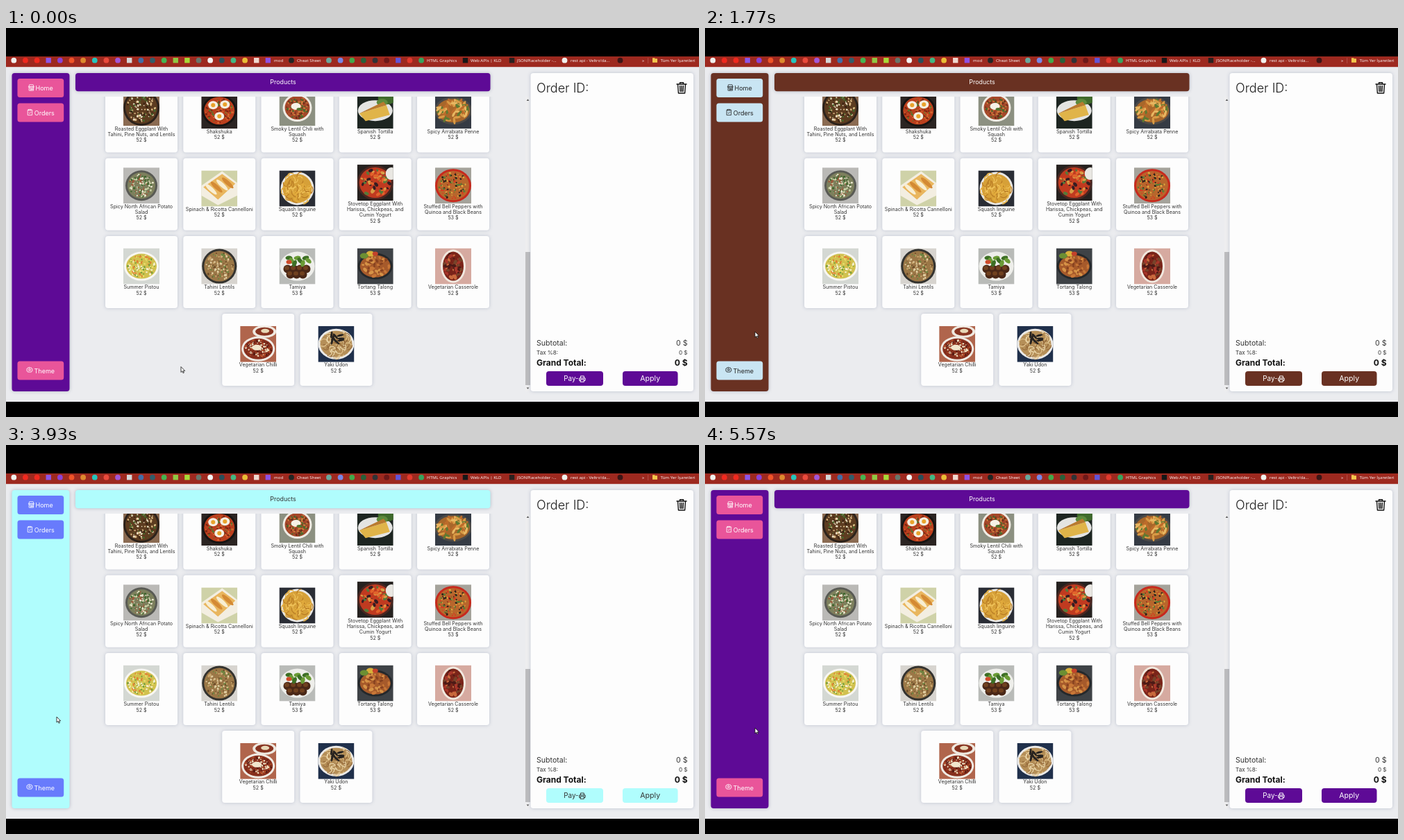
Animation, 998 px wide and 561 px high, one loop 5.61 s. Source, as an HTML page with a canvas:

```html
<!DOCTYPE html>
<html lang="en">
<head>
<meta charset="utf-8">
<title>Order screen</title>
<style>
html, body { margin: 0; width: 100%; height: 100%; overflow: hidden; background: #000; }
canvas { display: block; width: 998px; height: 561px; }
</style>
</head>
<body>
<canvas id="stage"></canvas>
<script>
const W = 998, H = 561, LOOP = 5610;
const dpr = window.devicePixelRatio || 1;
const UI = 'Inter, "Open Sans", sans-serif';
const BAR = '"Open Sans", "Noto Sans", sans-serif';

function setup(canvas) {
  canvas.width = W * dpr;
  canvas.height = H * dpr;
  const c = canvas.getContext("2d");
  c.scale(dpr, dpr);
  return c;
}
const screen2d = setup(document.getElementById("stage"));
const backdrop = document.createElement("canvas");
let g = setup(backdrop);

// ---- helpers ----
function rect(x, y, w, h, color) {
  g.fillStyle = color;
  g.fillRect(x, y, w, h);
}
function box(x, y, w, h, r, color, shadow) {
  g.save();
  if (shadow) {
    g.shadowColor = shadow;
    g.shadowBlur = 5 * dpr;
  }
  g.fillStyle = color;
  g.beginPath();
  g.roundRect(x, y, w, h, r);
  g.fill();
  g.restore();
}
function oval(x, y, rx, ry, color, turn = 0) {
  g.fillStyle = color;
  g.beginPath();
  g.ellipse(x, y, rx, ry, turn, 0, 7);
  g.fill();
}
function poly(points, color) {
  g.fillStyle = color;
  g.beginPath();
  points.forEach(p => g.lineTo(p[0], p[1]));
  g.closePath();
  g.fill();
}
function text(s, x, y, size, color, align = "left", weight = 400, family = UI) {
  g.font = `${weight} ${size}px ${family}`;
  g.fillStyle = color;
  g.textAlign = align;
  g.textBaseline = "alphabetic";
  g.fillText(s, x, y);
}
function icon(path, x, y, scale, color, width = 1) {
  g.save();
  g.translate(x, y);
  g.scale(scale, scale);
  g.strokeStyle = color;
  g.lineWidth = width;
  g.lineJoin = g.lineCap = "round";
  g.stroke(new Path2D(path));
  g.restore();
}
function random(seed) {
  return () => (seed = (seed * 16807) % 2147483647) / 2147483647;
}

const SHOP = "M1 4L2 .5H8L9 4M1 4Q2 6 3.5 4Q5 6 6.5 4Q8 6 9 4Z M1.5 5V9.5H8.5V5 M2.7 6.5H4.3V9.3 M5.6 6.5H7.4V8H5.6Z";
const CLIP = "M3 1.3H1.2V9.5H8.2V1.3H6.4 M3 .6H6.4V2.3H3Z M3.2 5.8L4.4 7L6.5 4.6";
const GEAR = "M4.5 .5L5.5 1.5L7 1L7.6 2.4L9 3L8.4 4.5L9 6L7.6 6.6L7 8L5.5 7.5L4.5 8.6L3.5 7.5L2 8L1.4 6.6L0 6L.6 4.5L0 3L1.4 2.4L2 1L3.5 1.5Z M6 4.5A1.5 1.5 0 1 1 3 4.5A1.5 1.5 0 1 1 6 4.5";
const PRINT = "M2.5 4V1H7.5V4 M2.5 7.5H.7V4H9.3V7.5H7.5 M2.5 6H7.5V9.5H2.5Z";
const TRASH = "M0 3H14 M4.5 3V.8H9.5V3 M1.5 3L2.4 16H11.6L12.5 3 M4.6 5.5L5 13.5 M7 5.5V13.5 M9.4 5.5L9 13.5";

// ---- dishes: name, price, ground, plate, food, bits, bit style, rx, ry ----
const dishes = [
  ["Roasted Eggplant With|Tahini, Pine Nuts, and Lentils", 52, "#8b6b52", "#2d231c", "#5d3c20", "#efe3c8,#d9b883,#47672c,#3a2314", "dot", 26, 26],
  ["Shakshuka", 52, "#2b2422", "#161413", "#bb3f1d", "#d96530,#7d2412,#53772d", "dot", 25, 23],
  ["Smoky Lentil Chili with|Squash", 52, "#8c9081", "#f0ece4", "#a5482a", "#d07a3c,#6f2b1a,#4d6b2c", "dot", 21, 20],
  ["Spanish Tortilla", 52, "#1d2521", "#e4e4e2", "#e4e4e2", "#e9e9e6", "none", 25, 15],
  ["Spicy Arrabiata Penne", 52, "#353b44", "#4c4a48", "#a8672a", "#d99b45,#e8b661,#bd6c2b,#5e7a31", "pasta", 27, 20],
  ["Spicy North African Potato|Salad", 52, "#bab9b6", "#595a54", "#7d805d", "#c9d1a5,#3c652c,#eae7cf,#9a5a3c", "dot", 23, 22],
  ["Spinach & Ricotta Cannelloni", 52, "#cfd2a8", "#f0ede2", "#f0ede2", "#f4f1e8", "none", 20, 10],
  ["Squash linguine", 52, "#2a2d35", "#e9e8e5", "#d6a038", "#f0c45c,#b87b24,#e5ae3e", "strand", 24, 24],
  ["Stovetop Eggplant With|Harissa, Chickpeas, and|Cumin Yogurt", 52, "#25211f", "#4a2620", "#c03a20", "#e2632b,#341d22,#557a39,#d99c46", "blob", 26, 25],
  ["Stuffed Bell Peppers with|Quinoa and Black Beans", 53, "#a5a39b", "#c72a1d", "#b8662c", "#e0a93f,#2c211b,#5a7b35,#d83a20", "dot", 26, 24],
  ["Summer Pistou", 52, "#d4d8d3", "#f8f7f2", "#d1c14f", "#eadf6c,#78a03c,#e07f32,#f4f0cb", "dot", 25, 21],
  ["Tahini Lentils", 52, "#d7d4cf", "#34332f", "#9b7747", "#c9a66d,#6d4d2a,#6c8440,#e1cda0", "dot", 25, 25],
  ["Tamiya", 53, "#b9bbb8", "#eeeeea", "#eeeeea", "#e6e6e0", "none", 25, 21],
  ["Tortang Talong", 53, "#3e4246", "#24282b", "#a65a2b", "#c87737,#874220,#d69347", "blob", 25, 19],
  ["Vegetarian Casserole", 52, "#d6aaa0", "#f1e9df", "#7a2419", "#a8362a,#4d1a16,#c96a3d,#77442a", "blob", 18, 24],
  ["Vegetarian Chilli", 52, "#b0654c", "#f0ebe4", "#872f1d", "#5a1d14,#b4502c,#efe2c2", "dot", 24, 18],
  ["Yaki Udon", 52, "#20304b", "#ecebe9", "#b58f58", "#dfc08a,#94693a,#ebd7ab", "strand", 26, 22]
];

function wedge() {
  oval(43, 8, 13, 9, "#3f6a2c");
  oval(36, 14, 8, 5, "#5d8a3c");
  poly([[3, 30], [42, 18], [47, 32], [12, 41]], "#e0b449");
  poly([[3, 30], [42, 18], [38, 13]], "#b97a2f");
}
function bake() {
  poly([[0, 22], [30, 1], [52, 18], [52, 36], [24, 50], [0, 36]], "#f3eee1");
  poly([[3, 24], [30, 5], [49, 19], [24, 42]], "#e9b65e");
  for (let i = 0; i < 4; i++) oval(14 + i * 8, 27 - i * 3, 11, 3, i % 2 ? "#d48a34" : "#f8eed2", 0.75);
}
function balls() {
  for (let i = 0; i < 7; i++) {
    const x = 12 + (i % 4) * 9 + (i > 3 ? 4 : 0), y = i > 3 ? 38 : 30;
    oval(x, y, 6, 6, "#4a2817");
    oval(x - 1, y - 1.5, 3.5, 3, "#70411f");
  }
  for (let i = 0; i < 8; i++) oval(14 + i * 4, 14 + (i % 3) * 4, 5, 3, i % 2 ? "#6a9b35" : "#3d6f25", i);
  oval(14, 20, 4, 3, "#cf4b2a");
}
const extras = {
  "Shakshuka": () => [[17, 18], [34, 17], [26, 34]].forEach(([x, y]) => {
    oval(x, y, 7, 6, "#f6efe2");
    oval(x, y, 3, 3, "#e9a32c");
  }),
  "Smoky Lentil Chili with": () => { oval(24, 24, 7, 5, "#f6f1e6"); oval(29, 28, 4, 2, "#50752f"); },
  "Spanish Tortilla": wedge,
  "Spinach & Ricotta Cannelloni": bake,
  "Stovetop Eggplant With": () => oval(49, 13, 8, 9, "#e9e7e2"),
  "Tamiya": balls,
  "Tortang Talong": () => { oval(19, 8, 6, 4, "#d8b23a"); oval(10, 11, 6, 4, "#6c8f33"); oval(26, 8, 4, 3, "#c4422a"); },
  "Vegetarian Chilli": () => { oval(35, 8, 17, 9, "#efe9e0"); oval(35, 8, 13, 6, "#873421"); oval(36, 7, 6, 3, "#e8d8b6"); oval(24, 31, 7, 4, "#f1e6cc"); },
  "Yaki Udon": () => { for (let i = 0; i < 9; i++) oval(26 + 7 * Math.cos(i * 2), 18 + 6 * Math.sin(i * 3), 5, 1.5, "#26221f", i); }
};

function drawFood(d, x, y, seed) {
  const [name, , ground, plate, food, bits, style, rx, ry] = d;
  const rnd = random(seed * 7919 + 13), colors = bits.split(",");
  const cy = name === "Vegetarian Chilli" ? 33 : 26;
  g.save();
  g.translate(x, y);
  g.beginPath();
  g.rect(0, 0, 52, 52);
  g.clip();
  rect(0, 0, 52, 52, ground);
  oval(26, cy, rx, ry, plate);
  oval(26, cy, rx - 3, ry - 3, food);
  const count = { dot: 130, strand: 60, pasta: 55, blob: 50, none: 0 }[style];
  for (let i = 0; i < count; i++) {
    const a = rnd() * 6.283, r = Math.sqrt(rnd()) * 0.94;
    const px = 26 + Math.cos(a) * r * (rx - 4), py = cy + Math.sin(a) * r * (ry - 4);
    const col = colors[i % colors.length], turn = rnd() * 6.283, s = 0.7 + rnd() * 1.2;
    if (style === "strand") {
      g.strokeStyle = col;
      g.lineWidth = 1.2;
      g.beginPath();
      g.arc(px, py, 3 + s * 2, turn, turn + 1.8);
      g.stroke();
    } else if (style === "pasta") oval(px, py, 5, 1.7, col, turn);
    else if (style === "blob") oval(px, py, 2 * s, 1.3 * s, col, turn);
    else oval(px, py, s, s * 0.8, col, turn);
  }
  if (extras[name.split("|")[0]]) extras[name.split("|")[0]]();
  g.restore();
}

function drawCard(d, i) {
  const row = Math.floor(i / 5), last = row === 3;
  const cx = (last ? 363.2 : 195) + (i % 5) * 112.25, cy = 127.5 + row * 112.2;
  box(cx - 52, cy - 52, 104, 104, 4, "#fdfdfd", "rgba(125,135,165,.42)");
  const lines = d[0].split("|").concat(d[1] + " $");
  const top = cy - (52 + lines.length * 8.3) / 2;
  drawFood(d, cx - 26, top, i + 1);
  lines.forEach((s, k) => text(s, cx, top + 58.6 + k * 8.3, 7.15, "#333", "center"));
}

// ---- bookmarks bar ----
const marks = "#f1f1ee #f0291f #f0291f #8d55e8 #8a42d6 #f05428 #dd8a2e #25c5bd #ea4a3c #a357d8 #d5d7d8 #416ea6 #315e6b #45b451 #8fc843 #a8d936 #68766b #f4f4f4 #274f5a #42b883 #e9bd36 #f0d8cf #8f51e3".split(" ");
const moreMarks = "#6aa89d #7787e6 #42a94b #28613a #303336 #6c1919 #6254d7 #e2392d #37a45d".split(" ");

function drawBar() {
  rect(0, 41, W, 15.2, "#9d291f");
  const dot = (x, color, square) => square ? rect(x - 3.7, 43, 7.4, 7.4, color) : oval(x, 46.7, 3.9, 3.9, color);
  marks.forEach((c, i) => dot(11.3 + i * 16.64, c, [3, 10, 14, 15, 21, 22].includes(i)));
  moreMarks.forEach((c, i) => dot(465 + i * 16.64, c, i === 6));
  dot(411, "#202624");
  dot(661.5, "#171717", true);
  dot(728.5, "#29211f", true);
  dot(804.5, "#f1f1ee");
  dot(884.5, "#3b1616");
  rect(931, 43.2, 3.5, 2, "#f4c64c");
  rect(931, 44.2, 7, 5.6, "#f4c64c");
  [["mod", 386], ["Cheat Sheet", 419], ["HTML Graphics", 606], ["Web APIs | KLD", 669],
   ["JSONPlaceholder -...", 736], ["rest api - Veltro'da...", 813], ["»", 916], ["Tüm Yer İşaretleri", 942.5]]
    .forEach(([s, x]) => text(s, x, 49, 6.15, "#fff", "left", 400, BAR));
  rect(924.5, 43, 0.6, 8, "#c46a62");
}

function drawBackdrop() {
  rect(0, 0, W, H, "#000");
  rect(0, 56, W, 483, "#ebecef");
  drawBar();
  g.save();
  g.beginPath();
  g.rect(100, 99, 655, 425);
  g.clip();
  dishes.forEach(drawCard);
  g.restore();
  rect(748, 99, 7, 425, "#eeeeef");
  rect(748, 323, 7, 192, "#bcbcbe");
  poly([[749.6, 105], [753.4, 105], [751.5, 102.6]], "#555");
  poly([[749.6, 518.4], [753.4, 518.4], [751.5, 520.8]], "#555");

  box(755.5, 65, 234.5, 459, 4, "#fdfdfd", "rgba(125,135,165,.42)");
  text("Order ID:", 764, 93, 18, "#1c1c1c", "left", 300);
  icon(TRASH, 966, 78, 1, "#111", 1.4);
  [["Subtotal:", 458, 10.6, 400], ["Tax %8:", 470.6, 8.1, 400], ["Grand Total:", 487, 12, 700]]
    .forEach(([s, y, size, weight]) => {
      text(s, 764, y, size, weight > 400 ? "#111" : "#333", "left", weight);
      text("0 $", 981.5, y, size, weight > 400 ? "#111" : "#333", "right", weight);
    });
}

// ---- themed parts ----
const themes = {
  purple: { main: "#5e0a96", head: "#fff", button: "#e9559a", label: "#fff" },
  brown: { main: "#693122", head: "#fff", button: "#c9e5f3", label: "#252525" },
  blue: { main: "#b0fdfd", head: "#333", button: "#687bfc", label: "#fff" }
};
const SOFT = "rgba(90,100,130,.4)";

function sideButton(label, path, x, y, t) {
  box(16.5, y, 66.7, 27, 3.5, t.button);
  icon(path, x - 10.7, y + 8.4, 0.92, t.label, 0.9);
  text(label, x, y + 17, 9, t.label);
}
function drawTheme(t) {
  box(8.5, 65, 83, 459, 4, t.main, SOFT);
  sideButton("Home", SHOP, 42.5, 73, t);
  sideButton("Orders", CLIP, 40.8, 108.5, t);
  sideButton("Theme", GEAR, 40.5, 480.5, t);
  box(100, 65, 597.5, 26.2, 4, t.main, SOFT);
  text("Products", 399, 81.2, 8.9, t.head, "center");
  box(778, 495, 82, 21, 4, t.main);
  box(888, 495, 79.5, 21, 4, t.main);
  text("Pay-", 803.3, 509.4, 9.8, t.head);
  icon(PRINT, 825, 501, 0.98, t.head, 1);
  text("Apply", 927.7, 509.4, 10.6, t.head, "center");
}
function drawMenu(t) {
  box(16.5, 364.5, 83, 91, 4, t.main, SOFT);
  ["Blue", "Purple", "Brown"].forEach((s, i) => {
    const y = 369 + i * 27.5;
    box(20.7, y, 75.2, 25, 3.5, t.button);
    text(s, 58.3, y + 15, 7.6, t.label, "center");
  });
}

// ---- pointer: time, x, y ----
const route = [
  [0, 252, 488.5], [60, 250, 488.5], [500, 44, 496], [680, 44, 496], [1050, 66, 437],
  [1770, 72, 438], [2200, 54, 494], [2480, 54, 494], [3070, 70, 412], [3420, 73, 384],
  [3600, 73, 384], [3930, 73, 392], [4400, 55, 495], [4640, 55, 495], [5050, 72, 408], [LOOP, 72, 408]
];
function pointerAt(ms) {
  let i = 1;
  while (i < route.length - 1 && ms >= route[i][0]) i++;
  const a = route[i - 1], b = route[i];
  const p = (ms - a[0]) / (b[0] - a[0]), e = p * p * (3 - 2 * p);
  return [a[1] + (b[1] - a[1]) * e, a[2] + (b[2] - a[2]) * e];
}
function drawPointer(x, y) {
  g.save();
  g.translate(x, y);
  const arrow = new Path2D("M0 0V8L1.9 6.3L3.1 9.2L4.4 8.6L3.2 5.9H5.7Z");
  g.fillStyle = "#fff";
  g.fill(arrow);
  g.strokeStyle = "#111";
  g.lineWidth = 0.8;
  g.stroke(arrow);
  g.restore();
}

const between = (ms, a, b) => ms >= a && ms < b;
function frame(now) {
  const ms = now % LOOP;
  const t = themes[between(ms, 1200, 3500) ? "brown" : between(ms, 3500, 5200) ? "blue" : "purple"];
  const open = between(ms, 560, 1200) || between(ms, 2300, 3500) || between(ms, 4470, 5200);
  g.drawImage(backdrop, 0, 0, W, H);
  drawTheme(t);
  if (open) drawMenu(t);
  drawPointer(...pointerAt(ms));
  requestAnimationFrame(frame);
}

drawBackdrop();
g = screen2d;
requestAnimationFrame(frame);
</script>
</body>
</html>
```
